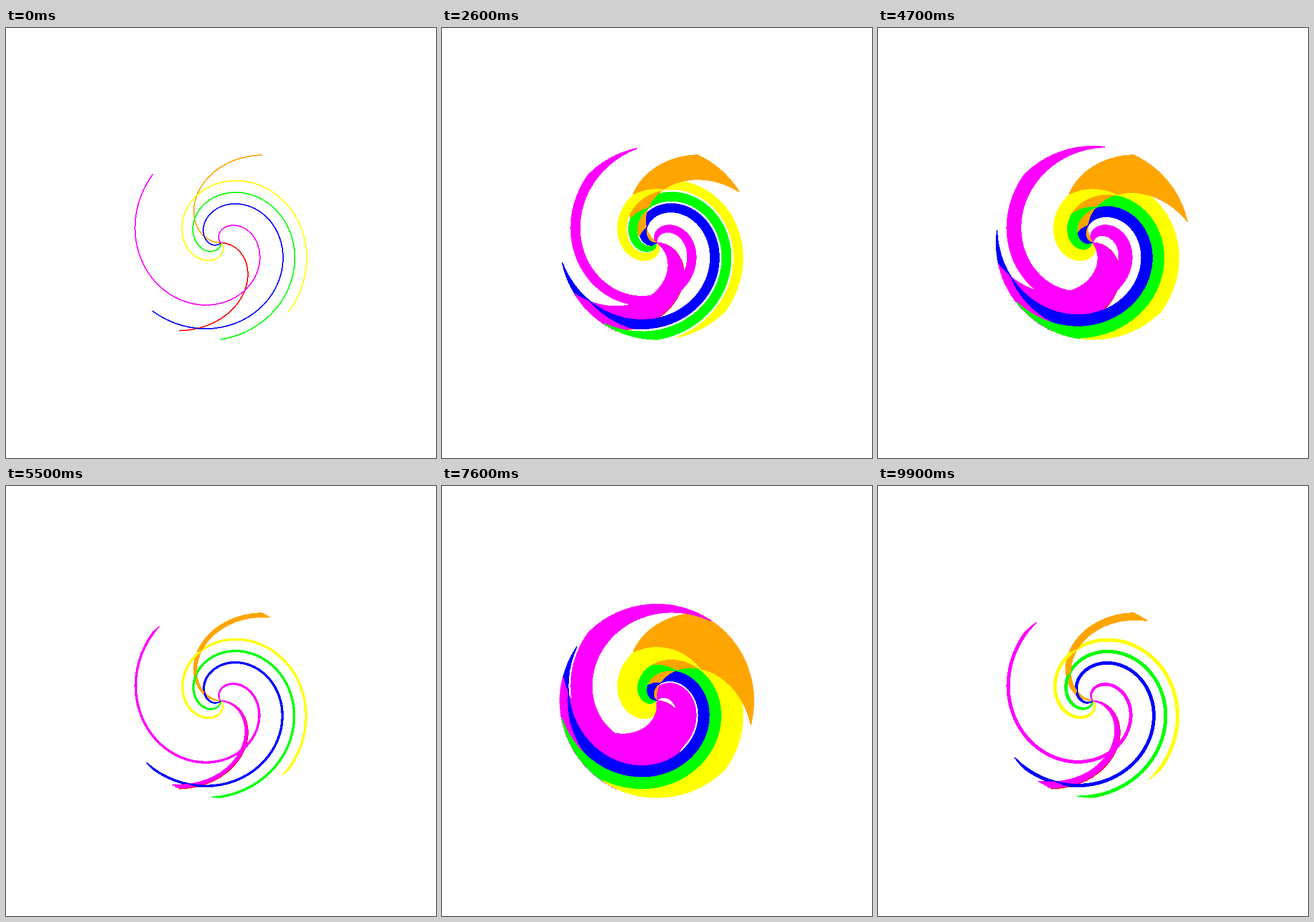
Write an HTML page that moves like this. It is 748x748 px and loops after 10000 ms.

```html
<!DOCTYPE html>
<html lang="en">
<head>
<meta charset="utf-8">
<title>Spirals</title>
<style>
  html, body { margin: 0; width: 100%; height: 100%; overflow: hidden; background: #fff; }
  svg { display: block; width: 748px; height: 748px; }
  path {
    fill: none;
    stroke-width: 2;
    stroke-linecap: round;
    stroke-linejoin: round;
    shape-rendering: crispEdges;
  }
</style>
</head>
<body>
<svg id="stage" viewBox="0 0 748 748"></svg>
<script>
const CENTER = 373.75, STEP = 5; // STEP in degrees along an arm
const FRAME_MS = 100, FRAMES = 100;
const TIGHT = 84 / Math.PI, WIDE = 84; // radius gained per radian
const MAGENTA = '#ff00ff';

// start angle, total turn (degrees clockwise), growth, colour
const arms = [
  [0, 115, WIDE, '#ff0000'],
  [180, 115, WIDE, '#ffa500'],
  [45, 360, TIGHT, '#ffff00'],
  [90, 360, TIGHT, '#00ff00'],
  [135, 360, TIGHT, '#0000ff'],
  [225, 360, TIGHT, MAGENTA]
];

const rad = deg => deg * Math.PI / 180;

const make = (tag, attrs, parent) => {
  const el = document.createElementNS('http://www.w3.org/2000/svg', tag);
  for (const key in attrs) el.setAttribute(key, attrs[key]);
  return parent.appendChild(el);
};

// Archimedean spiral, already turned by `turn` degrees
function spiral(start, sweep, growth, turn) {
  const points = [];
  for (let a = 0; a <= sweep; a += STEP) {
    const r = growth * rad(a);
    const dir = rad(start + turn + a);
    const x = CENTER + r * Math.cos(dir);
    const y = CENTER + r * Math.sin(dir);
    points.push(x.toFixed(2) + ' ' + y.toFixed(2));
  }
  return 'M' + points.join('L');
}

const stage = document.getElementById('stage');
const layers = [];
for (let turn = 0; turn < FRAMES; turn++) {
  const layer = make('g', { display: 'none' }, stage);
  arms.forEach(([start, sweep, growth, color], i) => {
    // the first arm is red only before the first turn
    const stroke = i === 0 && turn > 0 ? MAGENTA : color;
    make('path', { d: spiral(start, sweep, growth, turn), stroke }, layer);
  });
  layers.push(layer);
}

// Each block of eleven plays ten turns, then drops back to a one-digit turn
function turnAt(frame) {
  if (frame === 0) return 0;
  const block = Math.floor((frame - 1) / 11) + 1;
  const pos = (frame - 1) % 11;
  return pos < 10 ? block * 10 + pos : block;
}

let shown = -1;
function show(turn) {
  if (turn === shown) return;
  layers.forEach((layer, i) => layer.setAttribute('display', i <= turn ? 'inline' : 'none'));
  shown = turn;
}

const begin = performance.now();
function tick() {
  const t = performance.now() - begin;
  show(turnAt(Math.floor(t / FRAME_MS) % FRAMES));
  requestAnimationFrame(tick);
}
tick();
</script>
</body>
</html>
```
